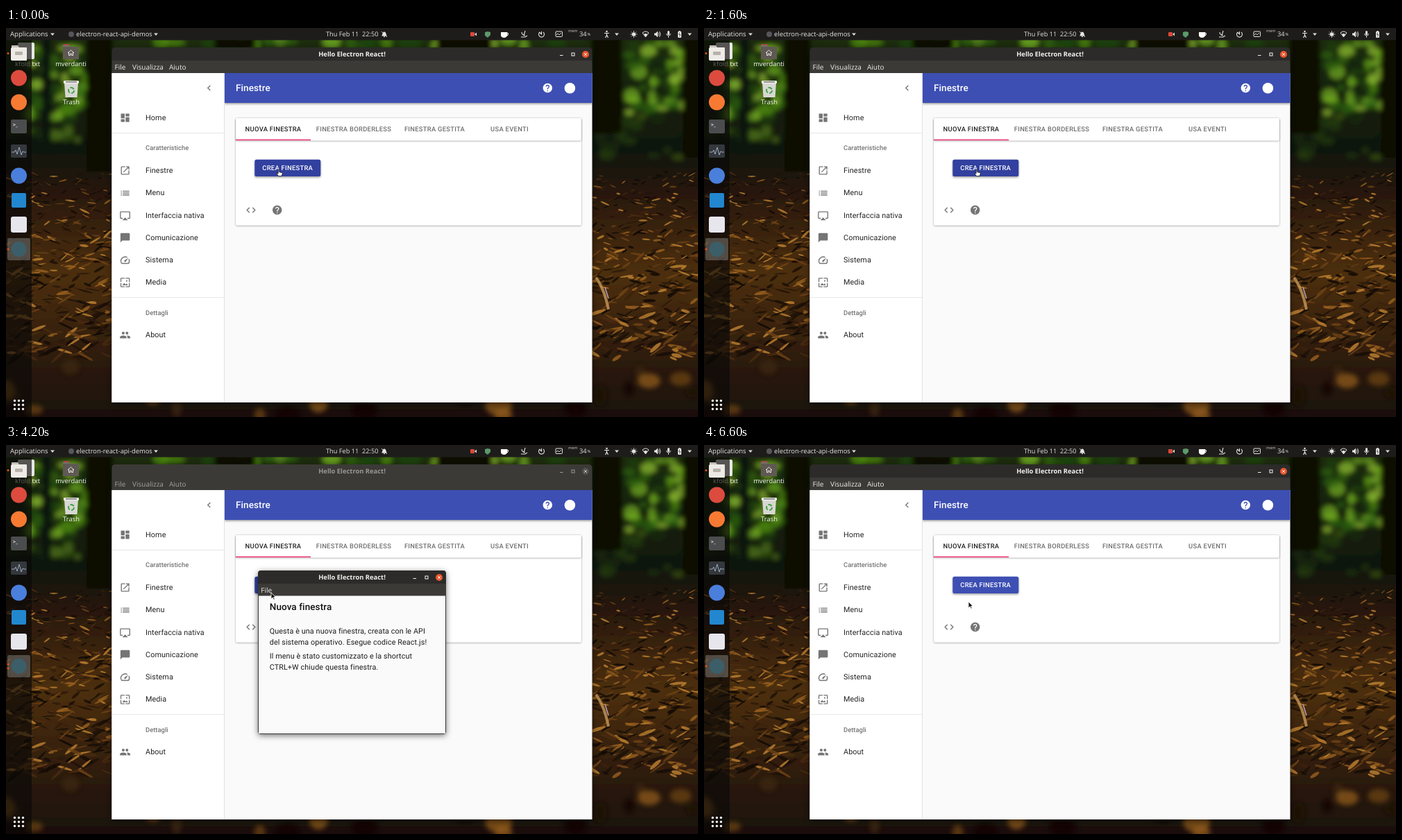
Write an HTML page that moves like this. It is 997 px wide and 561 px high and loops after 6700 ms.

```html
<!DOCTYPE html>
<html lang="it">
<head>
<meta charset="utf-8">
<title>Finestre</title>
<style>
html, body { margin: 0; width: 100%; height: 100%; overflow: hidden; background: #0b0b08; }
svg { display: block; width: 997px; height: 561px; }
text { white-space: pre; text-rendering: geometricPrecision; }
.ui { font-family: "Open Sans", "Noto Sans", sans-serif; }
.app { font-family: Roboto, sans-serif; }
</style>
</head>
<body>
<svg id="stage" viewBox="0 0 997 561" xmlns="http://www.w3.org/2000/svg"></svg>
<script>
const LOOP = 6700, STEP = 100;
const OPEN = 1800, MENU = 4600, CLOSE = 6400;
const DARK = '#2c2b29', BAR = '#3c3a37', GREY = '#757575', BLUE = '#3d4fb3', HOVER = '#303f9f';

const rect = (x, y, w, h, fill, extra = '') =>
  `<rect x="${x}" y="${y}" width="${w}" height="${h}" fill="${fill}" ${extra}/>`;
const circle = (x, y, r, fill, extra = '') =>
  `<circle cx="${x}" cy="${y}" r="${r}" fill="${fill}" ${extra}/>`;
const ellipse = (x, y, rx, ry, fill, extra = '') =>
  `<ellipse cx="${x}" cy="${y}" rx="${rx}" ry="${ry}" fill="${fill}" ${extra}/>`;
const path = (d, fill, extra = '') => `<path d="${d}" fill="${fill}" ${extra}/>`;
const line = (d, color, w = 1, extra = '') =>
  path(d, 'none', `stroke="${color}" stroke-width="${w}" ${extra}`);
const text = (cls, x, y, size, fill, s, extra = '') =>
  `<text class="${cls}" x="${x}" y="${y}" font-size="${size}" fill="${fill}" ${extra}>${s}</text>`;
const group = (body, extra = '') => `<g ${extra}>${body}</g>`;
const MID = 'text-anchor="middle"', BOLD = 'font-weight="700"', MEDIUM = 'font-weight="500"';

// 24-unit icons, drawn around their centre
const ICONS = {
  dashboard: 'M3 13h8V3H3zM3 21h8v-6H3zM13 21h8V11h-8zM13 3v6h8V3z',
  open: 'M19 19H5V5h7V3H5c-1.1 0-2 .9-2 2v14c0 1.1.9 2 2 2h14c1.1 0 2-.9 2-2v-7h-2zM14 3v2h3.6l-9.8 9.8 1.4 1.4L19 6.4V10h2V3z',
  list: 'M3 13h2v-2H3zM3 17h2v-2H3zM3 9h2V7H3zM7 13h14v-2H7zM7 17h14v-2H7zM7 7v2h14V7z',
  screen: 'M6 22h12l-6-6zM21 3H3c-1.1 0-2 .9-2 2v12c0 1.1.9 2 2 2h4v-2H3V5h18v12h-4v2h4c1.1 0 2-.9 2-2V5c0-1.1-.9-2-2-2z',
  chat: 'M20 2H4c-1.1 0-2 .9-2 2v18l4-4h14c1.1 0 2-.9 2-2V4c0-1.1-.9-2-2-2z',
  speed: 'M20.4 8.6l-1.2 1.8a8 8 0 0 1-.3 7.6H5.1A8 8 0 0 1 15.6 6.9l1.8-1.3A10 10 0 0 0 3.4 19a2 2 0 0 0 1.7 1h13.8a2 2 0 0 0 1.8-1 10 10 0 0 0-.3-10.4zM10.6 15.4a2 2 0 0 0 2.8 0l5.7-8.5-8.5 5.7a2 2 0 0 0 0 2.8z',
  picture: 'M4 4h7V2H4a2 2 0 0 0-2 2v7h2zM10 13l-4 5h12l-3-4-2 2.7zM17 8.5a1.5 1.5 0 1 0-3 0 1.5 1.5 0 0 0 3 0zM20 2h-7v2h7v7h2V4a2 2 0 0 0-2-2zM20 20h-7v2h7a2 2 0 0 0 2-2v-7h-2zM4 13H2v7a2 2 0 0 0 2 2h7v-2H4z',
  people: 'M16 11a3 3 0 1 0-3-3 3 3 0 0 0 3 3zM8 11a3 3 0 1 0-3-3 3 3 0 0 0 3 3zM8 13c-2.3 0-7 1.2-7 3.5V19h14v-2.5c0-2.3-4.7-3.5-7-3.5zM16 13l-1 .1c1.2.8 2 1.9 2 3.4V19h6v-2.5c0-2.3-4.7-3.5-7-3.5z',
  back: 'M15.4 7.4L14 6l-6 6 6 6 1.4-1.4-4.6-4.6z',
  help: 'M12 2a10 10 0 1 0 0 20 10 10 0 0 0 0-20zM13 19h-2v-2h2zM15.1 11.2l-.9 1C13.4 12.9 13 13.5 13 15h-2v-.5c0-1.1.4-2.1 1.2-2.8l1.2-1.3c.4-.4.6-.9.6-1.4a2 2 0 0 0-4 0H8a4 4 0 0 1 8 0c0 .9-.4 1.7-.9 2.2z',
  code: 'M9.4 16.6L4.8 12l4.6-4.6L8 6l-6 6 6 6zM14.6 16.6l4.6-4.6-4.6-4.6L16 6l6 6-6 6z'
};
const icon = (name, x, y, fill = GREY, size = 16.2) =>
  path(ICONS[name], fill, `fill-rule="evenodd" transform="translate(${x} ${y}) scale(${size / 24}) translate(-12 -12)"`);

function seeded(seed) {
  return () => (seed = (seed * 16807) % 2147483647) / 2147483647;
}

// Forest photo reduced to soft patches and scattered leaves
function forest() {
  const rnd = seeded(4711);
  const pick = a => a[Math.floor(rnd() * a.length)];
  const scatter = (n, fn) => Array.from({ length: n }, fn).join('');
  let soft = rect(-20, 0, 1040, 590, 'url(#ground)');
  const glow = (n, x, y, w, h, r, colors) => scatter(n, () =>
    ellipse(x + rnd() * w, y + rnd() * h, r * (.5 + rnd()), r * (.4 + rnd() * .8), pick(colors), 'opacity=".75"'));
  const greens = ['#4f8a12', '#72aa20', '#2f6410', '#8cb832', '#1d420c'];
  soft += glow(46, 35, 20, 85, 110, 9, greens);
  soft += glow(42, 895, 18, 85, 105, 9, greens);
  soft += glow(24, 150, 14, 700, 14, 12, greens);
  soft += glow(14, 0, 140, 150, 60, 9, ['#2c4a10', '#1a2d0a', '#4b6a18']);
  soft += glow(14, 850, 125, 150, 65, 9, ['#23380e', '#182809', '#3a5214']);
  soft += rect(116, 12, 38, 195, '#070805') + rect(52, 12, 13, 170, '#0d1407');
  soft += rect(843, 12, 44, 140, '#090b06') + rect(975, 12, 30, 175, '#0b0d06');
  soft += rect(300, 12, 60, 20, '#090c05') + rect(620, 12, 80, 20, '#0a0d06');

  const tones = ['#0d0804', '#1b1008', '#2c1a0b', '#4a2c10', '#6f4416', '#9a611f', '#c08332', '#150d06', '#3a220d'];
  const leaf = (x, y, k) => {
    const a = -45 + rnd() * 75;
    return ellipse(0, 0, k * (4 + rnd() * 8), k * (.7 + rnd() * 1.5), pick(tones),
      `opacity=".8" transform="translate(${x.toFixed(1)} ${y.toFixed(1)}) rotate(${a.toFixed(0)})"`);
  };
  const strip = (x, w) => scatter(430, () => {
    const y = 207 + rnd() * 270;
    return leaf(x + rnd() * w, y, .5 + (y - 200) / 330);
  });
  const sharp = strip(0, 156) + strip(843, 156) +
    line('M850 360q12 16 18 46', '#c79a5c', 4, 'opacity=".8"') +
    line('M863 374l5 16', '#b8a0b4', 1.5);
  const amber = glow(34, 0, 485, 997, 80, 13, ['#3c250c', '#6b4314', '#1a1007', '#905c1b', '#0d0804']);
  return group(soft, 'filter="url(#b4)"') + group(sharp, 'filter="url(#b1)"') + group(amber, 'filter="url(#b4)"');
}

const caret = (x, y = 7.5) => path(`M${x - 3} ${y}h6l-3 3.5z`, '#ddd');

function topBar() {
  const w = '#e4e4e2';
  return rect(0, 0, 997, 17.5, '#1d1c1b') +
    text('ui', 6, 12.3, 9.6, w, 'Applications') + caret(67) +
    circle(94, 9, 4, '#55565a') +
    text('ui', 101, 12.3, 9.4, w, 'electron-react-api-demos') + caret(216) +
    text('ui', 461, 12.3, 9.2, w, 'Thu Feb 11  22:50') +
    path('M541 11.5c1.5-1 1-6 4-6s2.500 5 4 6z', w) + circle(545, 12.3, 1, w) + line('M541 5l8 8', w, .9) +
    rect(669, 6, 6, 6, '#d9493a', 'rx="1"') + path('M675 9l3-2.500v5z', '#ddd') +
    path('M690 6l4-1 4 1v4l-4 4-4-3z', '#5c9a6b') +
    path('M713 6h9v5q-1 3-4.500 3t-4.500-3z', '#fff') + line('M722 7q3 1 0 4', '#fff', 1.2) +
    line('M743 6q0 4 5 5M748 4l-2 7M742 13h6l3-2', w, 1.1) +
    line('M769 6a4 4 0 1 0 5 0M771.500 5v4l-3-3', w, 1.1) +
    rect(792, 5, 9.500, 7.500, 'none', `stroke="${w}" rx="1"`) + line('M793 10l2-2 2 2 3-3', w, .9) +
    text('ui', 810, 6, 5.6, '#c8c8c6', 'mem') + text('ui', 826, 12.3, 9.4, w, '34') +
    text('ui', 837.5, 11, 5.5, w, '%') +
    circle(865.5, 5, 1.3, w) + line('M862 7.500h7M865.500 7v3.500l-2 3.500M865.500 10l2 4', w, 1.2) + caret(880) +
    circle(904.5, 9, 2.6, w) + line('M904.500 4v10M899.500 9h10M901 5.500l7 7M908 5.500l-7 7', w, .8) +
    line('M917 7q4.500-4 9 0l-4.500 6z', w, 1) + path('M919 9q2.500-2 5 0l-2.500 4z', w) +
    path('M934 7.500h2l3-3v9l-3-3h-2z', w) + line('M940 6.500q2 2.500 0 5M941.500 5q3 4 0 8', w, .9) +
    rect(953, 4, 3, 6, w, 'rx="1.5"') + line('M951.500 8q0 3 3 3t3-3M954.500 11v3', w, .9) +
    rect(968, 5, 5, 9, w, 'rx="1"') + rect(969.5, 4, 2, 1, w) + line('M970.500 6.500l-1 3h2l-1 3', '#333', .8) + caret(985);
}

function desktop() {
  const label = (x, y, s) => text('ui', x, y, 9.4, '#f4f4f2', s, MID);
  return rect(17, 21, 24, 24, '#e7e7e5', 'rx="2"') + label(31, 54.5, 'kfold.txt') +
    path('M82 24h9l2 3h12v18H82z', '#746d67') + rect(82, 27, 23, 18, '#5f5954', 'rx="1"') +
    line('M83 24h8', '#c0403a', 1.5) +
    line('M89 36l4.500-4 4.500 4M90.500 35v4.500h2v-2.500h2v2.500h2V35', '#e6e3df', 1) +
    label(93.5, 54.5, 'mverdanti') +
    path('M84 78h20l-1.500 22h-17z', '#d7d8d3') + rect(83, 76, 22, 4, '#f0f0ec', 'rx="1"') + rect(86, 77, 16, 1.5, '#777') +
    circle(94, 90, 4, 'none', 'stroke="#43a047" stroke-width="2" stroke-dasharray="6 2.4"') +
    label(94, 109.5, 'Trash');
}

function dock() {
  let dots = '';
  for (let i = 0; i < 9; i++) dots += circle(12.5 + i % 3 * 6, 537.5 + Math.floor(i / 3) * 6, 1.7, '#f2f2f2');
  return rect(0, 17.5, 37, 544, '#0b0a09', 'opacity=".66"') +
    rect(2, 303, 33, 32, '#fff', 'rx="2" opacity=".24"') +
    path('M8 25h9l2 3h11v19H8z', '#c6c0b9') + rect(7, 28, 23, 19, '#eeebe6', 'rx="2"') + rect(13, 34, 11, 5, '#b8b2aa', 'rx="1"') +
    circle(18.5, 72, 11.5, '#dc4b3e') + circle(18.5, 107, 11.5, '#f77a33') +
    rect(7, 132, 23, 20, '#4b4c4d', 'rx="2"') + text('ui', 10, 142, 7, '#eee', '&gt;_', BOLD) +
    rect(7, 168, 23, 19, '#34373c', 'rx="2"') + line('M8 179h4l2-3 2 6 3-10 3 11 2-5 2 1h3', '#a8b7c9', .9) +
    circle(18.5, 213, 11.5, '#4a7fdc') + rect(8, 238, 21, 21, '#2287cf', 'rx="2"') +
    rect(7, 272, 23, 23, '#e6e6ec', 'rx="3"') + circle(18.5, 319, 11, '#3c5e68') +
    circle(3, 36.5, 1.5, '#e95420') + dots;
}

// Title bar with its buttons; x positions are centres of the buttons
function titleBar(x, y, w, active, min, max, close) {
  const ink = active ? '#f3f2f0' : '#9a9894', cy = y + 10;
  return path(`M${x} ${y + 19}v-14q0-5 5-5h${w - 10}q5 0 5 5v14z`, active ? DARK : BAR) +
    text('ui', 498.5, y + 13.4, 9.4, ink, 'Hello Electron React!', `${BOLD} ${MID}`) +
    rect(min - 2, cy + 1, 4.5, 1, ink) +
    rect(max - 2, cy - 2, 4, 4, 'none', `stroke="${ink}"`) +
    circle(close, cy, 5, active ? '#e9562f' : '#55534f') +
    line(`M${close - 1.8} ${cy - 1.8}l3.600 3.600m0-3.600l-3.600 3.600`, active ? '#fff' : '#d0cecb', 1);
}

function mainFrame(active) {
  const ink = active ? '#eeedeb' : '#a3a19d';
  const menu = (x, s) => text('ui', x, 59.6, 10, ink, s);
  return titleBar(152.5, 28, 692, active, 800, 817, 835) +
    rect(152.5, 47, 692, 18.5, BAR) +
    menu(156.5, 'File') + menu(182, 'Visualizza') + menu(235, 'Aiuto');
}

function mainBody() {
  const rows = [['dashboard', 129, 'Home'], ['open', 205, 'Finestre'], ['list', 237.5, 'Menu'],
    ['screen', 270, 'Interfaccia nativa'], ['chat', 302, 'Comunicazione'], ['speed', 334.3, 'Sistema'],
    ['picture', 366.5, 'Media'], ['people', 442.3, 'About']];
  const tabs = [[385, 'NUOVA FINESTRA'], [501, 'FINESTRA BORDERLESS'], [617.5, 'FINESTRA GESTITA'], [725.5, 'USA EVENTI']];
  const sub = (y, s) => text('app', 201, y, 9.44, '#757575', s, MEDIUM);
  return rect(152.5, 65, 692, 475, '#fafafa') +
    rect(315, 65, 529.5, 43, BLUE, 'filter="url(#s2)"') + rect(844.5, 60, 8, 60, '#000', 'opacity="0"') +
    rect(152.5, 65, 162, 475, '#fff') + rect(314, 65, .8, 475, '#dadada') +
    icon('back', 292.5, 86.5) +
    rows.map(([i, y, s]) => icon(i, 171.6, y + .5) +
      text('app', 201, y + 3.7, 10.8, '#222', s, 'letter-spacing=".1"')).join('') +
    sub(176.2, 'Caratteristiche') + sub(413.5, 'Dettagli') +
    rect(152.5, 151, 161.5, .8, '#e0e0e0') + rect(152.5, 388.3, 161.5, .8, '#e0e0e0') +
    text('app', 331, 90.8, 13.5, '#fff', 'Finestre', `${MEDIUM} letter-spacing=".1"`) +
    icon('help', 780.3, 86.5, '#fff') + circle(812.4, 86.8, 7.8, '#fff') +
    rect(331, 130, 498, 154.5, '#fff', 'rx="2" filter="url(#s1)"') +
    rect(331, 130, 498, 32.3, '#fff', 'rx="2" filter="url(#s1)"') +
    rect(331, 162, 498, .6, '#e2e2e2') +
    tabs.map(([x, s], i) => text('app', x, 148.8, 9.44, i ? '#707070' : '#242424', s,
      `${MEDIUM} ${MID} letter-spacing=".27"`)).join('') +
    rect(331, 160.7, 108, 1.4, '#ea1f60') +
    icon('code', 353, 262.6) + icon('help', 390.7, 262.6);
}

function button(hover) {
  return rect(358.3, 189.8, 95, 24.3, hover ? HOVER : BLUE, 'rx="2.7" filter="url(#s2)"') +
    text('app', 405.7, 205.2, 9.44, '#fff', 'CREA FINESTRA', `${MEDIUM} ${MID} letter-spacing=".27"`);
}

function childWindow() {
  const lines = [[271.7, 'Questa è una nuova finestra, creata con le API'],
    [288, 'del sistema operativo. Esegue codice React.js!'],
    [307.6, 'Il menu è stato customizzato e la shortcut'],
    [323.9, 'CTRL+W chiude questa finestra.']];
  return rect(363, 181, 271, 236, '#3a3937', 'rx="4" filter="url(#s3)"') +
    titleBar(363, 181, 271, true, 588.5, 606, 624) +
    rect(363, 200, 271, 17.5, BAR) + rect(364, 217.5, 269, 198.5, '#fafafa') +
    text('app', 379.7, 237.5, 13.5, '#111', 'Nuova finestra', `${MEDIUM} letter-spacing=".1"`) +
    lines.map(([y, s]) => text('app', 379.7, y, 10.8, '#1c1c1c', s, 'letter-spacing=".1"')).join('');
}

const fileLabel = text('ui', 367.3, 212.8, 10, '#eeedeb', 'File');
const dropdown = rect(364, 200.5, 24, 17, '#4d4b48') +
  rect(363, 217, 103, 22, BAR, 'filter="url(#s1)"') +
  rect(363.5, 219, 102, 17.5, '#4d4b48', 'id="item"') +
  text('ui', 380, 231.3, 10, '#eeedeb', 'Close') + text('ui', 418, 231.3, 10, '#eeedeb', 'Ctrl+W');

const arrow = path('M0 0v9l2.200-2 1.500 3.200 1.500-.7-1.500-3h2.800z', '#161616', 'stroke="#fff" stroke-width=".8"');
const hand = path('M-.6 0q1.200-.8 1.400 1v2.800l3.800.8q.8.300.5 2l-.9 3h-4.700l-2.600-3.600q-.2-1.200 1.200-.6l.9.8z', '#fff',
  'stroke="#111" stroke-width=".8"');

const shadow = (id, dy, blur, a) => `<filter id="${id}" x="-20%" y="-20%" width="140%" height="160%">` +
  `<feDropShadow dx="0" dy="${dy}" stdDeviation="${blur}" flood-opacity="${a}"/></filter>`;
const blur = (id, r) => `<filter id="${id}"><feGaussianBlur stdDeviation="${r}"/></filter>`;
const defs = `<defs><linearGradient id="ground" x1="0" y1="0" x2="0" y2="1">
  <stop offset="0" stop-color="#1c2f0b"/><stop offset=".3" stop-color="#10170a"/>
  <stop offset=".4" stop-color="#271708"/><stop offset=".6" stop-color="#4d2f11"/>
  <stop offset=".82" stop-color="#2b1a0a"/><stop offset="1" stop-color="#140c05"/></linearGradient>
  ${blur('b4', 3.5)}${blur('b1', .6)}${shadow('s1', .8, .8, .4)}${shadow('s2', 1.5, 1.5, .4)}${shadow('s3', 2, 4, .55)}</defs>`;

const part = (id, body) => group(body, `id="${id}"`);
document.getElementById('stage').innerHTML = defs + forest() + desktop() + dock() + topBar() +
  part('dots1', circle(3, 319, 1.5, '#e95420')) +
  part('dots2', circle(3, 316, 1.5, '#e95420') + circle(3, 322, 1.5, '#e95420')) +
  rect(152.5, 30, 692, 510, '#222', 'rx="4" filter="url(#s3)"') +
  part('active', mainFrame(true)) + part('inactive', mainFrame(false)) + mainBody() +
  part('hot', button(true)) + part('cold', button(false)) +
  part('child', childWindow() + part('menu', dropdown) + fileLabel) +
  part('pointer', part('hand', hand) + part('arrow', arrow));

const $ = id => document.getElementById(id);
const show = (id, on) => $(id).setAttribute('visibility', on ? 'visible' : 'hidden');
const showChild = (id, on) => { $(id).style.display = on ? '' : 'none'; };

// time, x, y of the pointer tip
const PATH = [[0, 393, 204], [1900, 393, 204], [2400, 395, 205.5], [3300, 395, 205.5], [3500, 398, 213],
  [4200, 382, 213], [4500, 378, 212], [5300, 378, 212], [5900, 381, 226], [LOOP, 381, 226]];

function pointerAt(t) {
  const i = PATH.findIndex(p => p[0] > t);
  const [t0, x0, y0] = PATH[i - 1], [t1, x1, y1] = PATH[i];
  const u = (t - t0) / (t1 - t0), k = u * u * (3 - 2 * u);
  return [x0 + (x1 - x0) * k, y0 + (y1 - y0) * k];
}

function draw(now) {
  const t = Math.floor(now % LOOP / STEP) * STEP;
  const child = t >= OPEN && t < CLOSE, hot = t < CLOSE;
  const [x, y] = pointerAt(t);
  show('active', !child);
  show('inactive', child);
  show('dots1', !child);
  show('dots2', child);
  show('hot', hot);
  show('cold', !hot);
  showChild('child', child);
  showChild('menu', t >= MENU);
  showChild('item', y > 219);
  showChild('hand', t < OPEN);
  showChild('arrow', t >= OPEN);
  $('pointer').setAttribute('transform', `translate(${x} ${y})`);
}

const start = performance.now();
function tick() {
  draw(performance.now() - start);
  requestAnimationFrame(tick);
}
tick();
</script>
</body>
</html>
```
